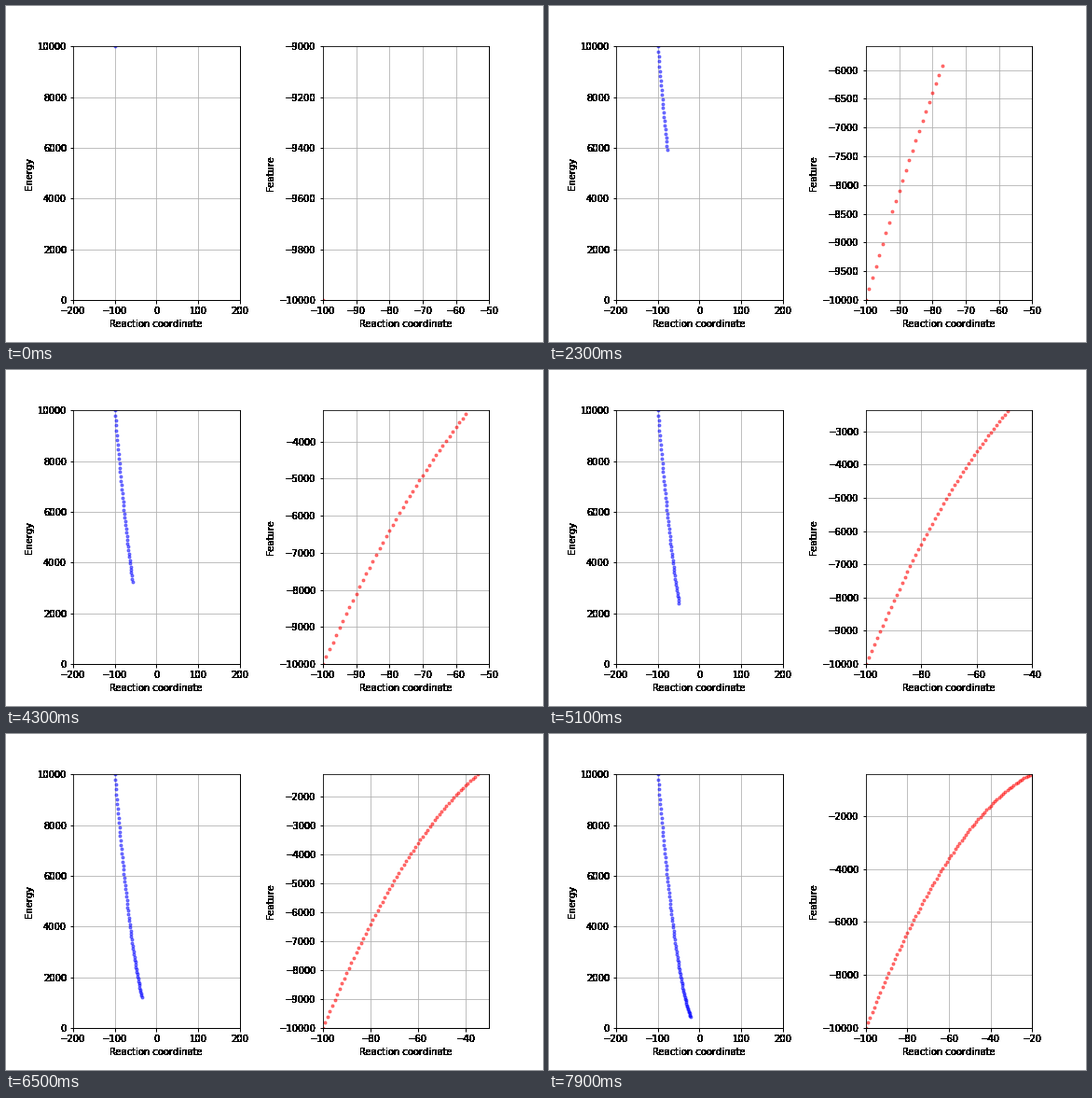
Recreate the animation shown at these times as a matplotlib script. Size 576x360 px, loop 8 s.

```python
import numpy as np
import matplotlib.pyplot as plt
from matplotlib.animation import FuncAnimation

FRAMES = 80
X0, STEP = -100, 1

fig, (left, right) = plt.subplots(1, 2, figsize=(8, 5), dpi=72, facecolor="white")
fig.subplots_adjust(left=0.125, right=0.9, bottom=0.125, top=0.88, wspace=0.5)


def crisp(img, dpi):
    """Turn antialiased text into solid black pixels."""
    out = np.zeros_like(img)
    out[..., 3] = img[..., 3] > 0.05
    return out, 0, 0


def setup(ax, ylabel, style):
    ax.set_xlabel("Reaction coordinate")
    ax.set_ylabel(ylabel)
    ax.grid(True)
    ax.tick_params(width=1)
    for side in ("right", "bottom"):
        ax.spines[side].set_linewidth(1)
    for label in (ax.xaxis.label, ax.yaxis.label):
        label.set_agg_filter(crisp)
    return ax.plot([], [], style, alpha=0.5)[0]


energy = setup(left, "Energy", "b.")
feature = setup(right, "Feature", "r.")
left.set(xlim=(-200, 200), ylim=(0, 10000))


def limits(xs):
    """Upper limits of the right plot, raised once per point that reaches them."""
    xmax, ymax = -50, -9000
    for x in xs:
        if x >= xmax:
            xmax += 10
        if -x**2 >= ymax:
            ymax /= 1.1
    return xmax, ymax


def update(i):
    xs = X0 + STEP * np.arange(i + 1.0)
    energy.set_data(xs, xs**2)
    feature.set_data(xs, -xs**2)
    xmax, ymax = limits(xs)
    right.set(xlim=(X0, xmax), ylim=(-10000, ymax))
    for ax in (left, right):
        for label in ax.get_xticklabels() + ax.get_yticklabels():
            label.set_agg_filter(crisp)
    return energy, feature


anim = FuncAnimation(fig, update, frames=FRAMES, interval=100,
                     repeat=True, repeat_delay=0, blit=False)
plt.show()
```
